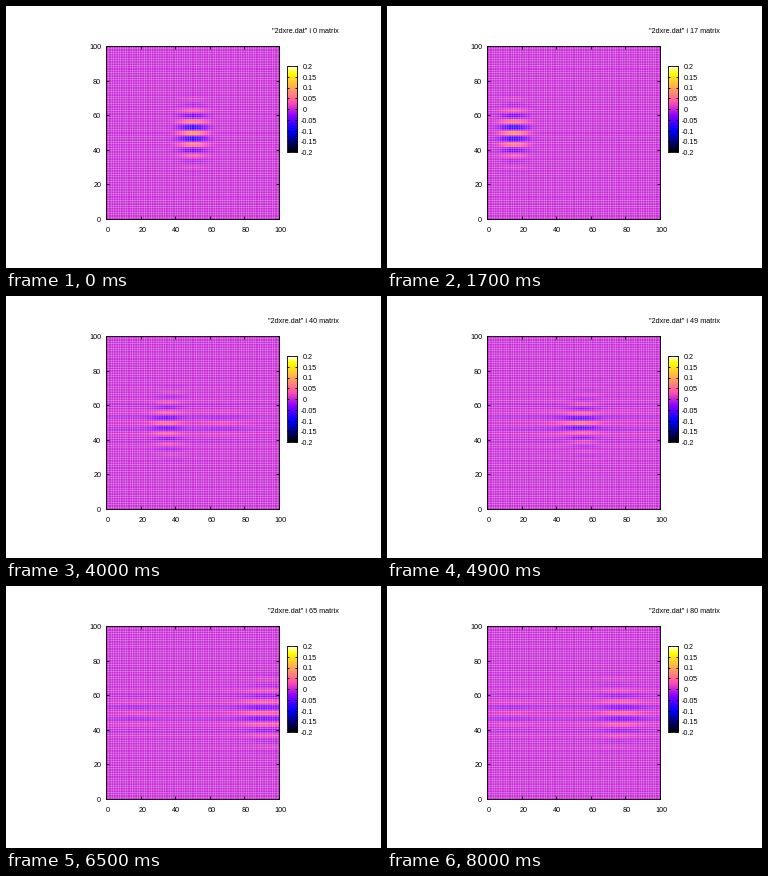
A matplotlib script that plays this animation: 375 px wide and 262 px high, repeating every 8.1 s.

```python
import numpy as np
import matplotlib.pyplot as plt
from matplotlib.animation import FuncAnimation
from matplotlib.patches import Rectangle

WIDTH, HEIGHT, DPI = 375, 262, 100
PIXEL = 72 / DPI
FRAMES, INTERVAL = 81, 100
LEFT, RIGHT, TOP, BOTTOM = 100.5, 273.5, 40.5, 213.5
BAR_LEFT, BAR_RIGHT, BAR_TOP, BAR_BOTTOM = 281.5, 291.5, 60.5, 146.5
CELLS = 100
CELL = (RIGHT - LEFT) / CELLS
LIMIT = 0.2
WALL_TIME = 24.4
WAVE_NUMBER = 0.95

plt.rcParams["font.family"] = "Liberation Sans"
plt.rcParams["font.size"] = 7.25 * PIXEL


def colorize(values):
    """Black-blue-violet-yellow-white ramp over -LIMIT..LIMIT."""
    g = np.clip((values / LIMIT + 1) / 2, 0, 1)
    red = g / 0.32 - 0.78125
    green = 2 * g - 0.84
    blue = np.select([g < 0.25, g < 0.42, g < 0.92],
                     [4 * g, np.ones_like(g), 1.84 - 2 * g], g / 0.08 - 11.5)
    return np.clip(np.stack([red, green, blue], axis=-1), 0, 1)


def smooth(t, start, end):
    s = np.clip((t - start) / (end - start), 0, 1)
    return s * s * (3 - 2 * s)


def packet(center, sx, sy, wave=WAVE_NUMBER, curve=0.0):
    """Striped Gaussian; curve pushes its outer stripes along x."""
    dy = Y - 50
    dx = X - center - curve * dy**2
    return np.exp(-(dx / sx)**2 / 2 - (dy / sy)**2 / 2) * np.cos(wave * dy)


def field(t):
    """Packet drifting left, then bouncing between the walls and spreading."""
    after = smooth(t, 22, 29)
    late = smooth(t, 28, 80)
    incoming = 0.092 * (1 - 0.06 * smooth(t, 0, 17)) * (1 - after)
    u = incoming * packet(50 - 2.05 * t, 5.3, 9)
    if after == 0:
        return u

    path = 2.2 * (t - WALL_TIME)
    wave = WAVE_NUMBER + 0.2 * np.exp(-((t - 49) / 10) ** 2)
    amp = after * (0.042 - 0.014 * late)
    for center, sign in ((path, 1), (200 - path, -1)):
        u = u + amp * packet(center, 5 + 3 * late, 10.5, wave, sign * 0.01)

    # Fainter part that enters from the opposite side.
    leak = 100 - 2.05 * (t - WALL_TIME)
    for center, sign in ((leak, -1), (-leak, 1)):
        u = u + 0.013 * after * packet(center, 9, 5 + 3 * late, curve=sign * 0.02)

    lead = 100 - abs(100 - path)
    wake = 0.009 * packet(lead, 28, 8 + 3 * late)
    return u + after * smooth(t, 24, 45) * (wake + 0.004 * packet(50, 90, 8))


def seam(pixels):
    """White left over where two antialiased cells meet inside a pixel."""
    offset = pixels - LEFT
    part = np.ceil(offset / CELL) * CELL - offset
    return np.where(part < 1, part * (1 - part), 0)


def cell_index(distance):
    return np.clip((distance / CELL).astype(int), 0, CELLS - 1)


def render(t):
    rgb = colorize(field(t))[np.ix_(cell_rows, cell_columns)]
    return rgb + (1 - rgb) * seams


def line(xs, ys):
    ax.plot(xs, ys, color="black", lw=PIXEL, alpha=0.85, snap=False,
            solid_capstyle="butt", zorder=3)


def frame_box(x0, y0, x1, y1):
    ax.add_patch(Rectangle((x0, y0), x1 - x0, y1 - y0, fill=False, ec="black",
                           lw=PIXEL, alpha=0.85, snap=False, zorder=3))


X, Y = np.meshgrid(np.arange(CELLS) + 0.5, np.arange(CELLS) + 0.5)
columns = np.arange(int(LEFT), int(RIGHT) + 1)
rows = np.arange(int(TOP), int(BOTTOM) + 1)
cell_columns = cell_index(columns + 0.5 - LEFT)
cell_rows = cell_index(BOTTOM - rows - 0.5)
seam_x = seam(columns)
seam_y = seam(rows + LEFT - TOP)
seams = (1 - np.outer(1 - seam_y, 1 - seam_x))[..., None]

fig = plt.figure(figsize=(WIDTH / DPI, HEIGHT / DPI), dpi=DPI, facecolor="white")
ax = fig.add_axes([0, 0, 1, 1])
ax.axis("off")

image = ax.imshow(render(0), interpolation="nearest", aspect="auto", zorder=1,
                  extent=(columns[0], columns[-1] + 1, rows[-1] + 1, rows[0]))
ax.imshow(colorize(np.linspace(LIMIT, -LIMIT, 256)[:, None]), aspect="auto",
          extent=(BAR_LEFT, BAR_RIGHT, BAR_BOTTOM, BAR_TOP), zorder=1)
ax.set_xlim(0, WIDTH)
ax.set_ylim(HEIGHT, 0)
ax.set_autoscale_on(False)

frame_box(LEFT, TOP, RIGHT, BOTTOM)
frame_box(BAR_LEFT, BAR_TOP, BAR_RIGHT, BAR_BOTTOM)

for value in range(0, 101, 20):
    x = np.floor(LEFT + value * CELL) + 0.5
    y = np.floor(BOTTOM - value * CELL) + 0.5
    ax.text(x + 0.8, 226.3, str(value), ha="center", va="baseline")
    ax.text(95.2, y + 2.6, str(value), ha="right", va="baseline")
    for edge, inward in ((BOTTOM, -3), (TOP, 3)):
        line([x, x], [edge, edge + inward])
    for edge, inward in ((LEFT, 3), (RIGHT, -3)):
        line([edge, edge + inward], [y, y])

for step in range(-4, 5):
    y = (BAR_TOP + BAR_BOTTOM) / 2 - step * (BAR_BOTTOM - BAR_TOP) / 8
    label = f"{step * 0.05:.2g}"
    ax.text(295 if step < 0 else 297, y + 2.5, label, ha="left", va="baseline")
    for edge, inward in ((BAR_LEFT, 2), (BAR_RIGHT, -2)):
        line([edge, edge + inward], [np.floor(y) + 0.5] * 2)

title = ax.text(332.8, 27.2, "", ha="right", va="baseline")


def update(i):
    image.set_data(render(i))
    title.set_text(f'"2dxre.dat" i {i} matrix')
    return image, title


animation = FuncAnimation(fig, update, frames=FRAMES, interval=INTERVAL,
                          repeat=True, repeat_delay=0, blit=False)
plt.show()
```
